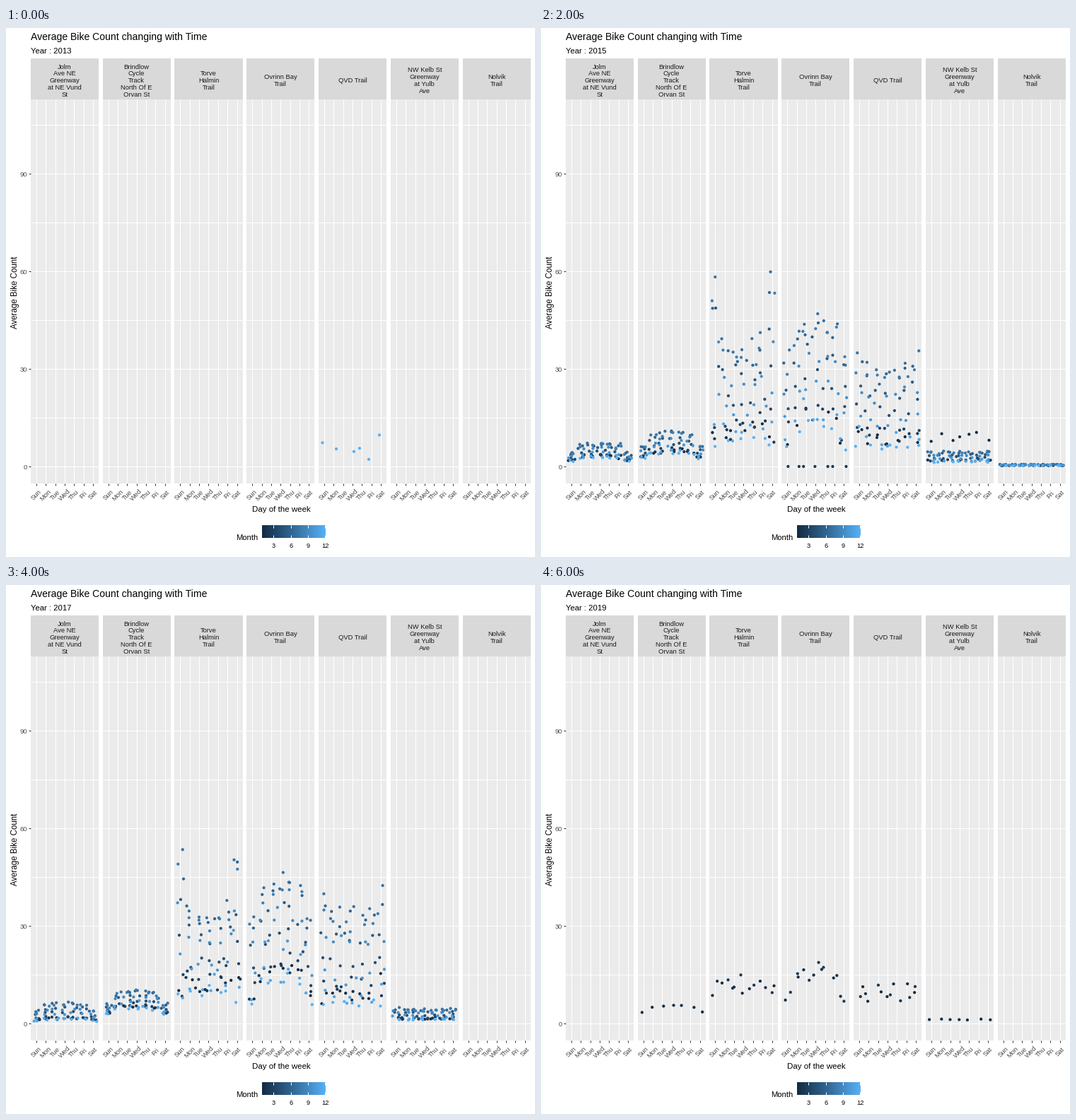
These frames come from a looping animation (748 by 748 pixels, 7 s). A matplotlib script:

```python
import matplotlib.pyplot as plt
import numpy as np
from matplotlib.animation import FuncAnimation
from matplotlib.colors import LinearSegmentedColormap
from matplotlib.patches import Rectangle

SIZE, DPI = 748, 100
LEFT, PITCH, WIDTH = 34.8, 101.8, 96.15
STRIP_TOP, TOP, BOTTOM = 43, 101, 644
ZERO_Y, UNIT = 620, 4.597
STEP = WIDTH / 7.2
DAYS = ["Sun", "Mon", "Tue", "Wed", "Thu", "Fri", "Sat"]
STRIPS = [
    "Jolm\nAve NE\nGreenway\nat NE Vund\nSt",
    "Brindlow\nCycle\nTrack\nNorth Of E\nOrvan St",
    "Torve\nHalmin\nTrail",
    "Ovrinn Bay\nTrail",
    "QVD Trail",
    "NW Kelb St\nGreenway\nat Yulb\nAve",
    "Nolvik\nTrail",
]
BLUES = LinearSegmentedColormap.from_list("blues", ["#132B43", "#336A98", "#56B1F7"])
YEARS = range(2013, 2020)

# Per panel: (low, high) at the weekend, at midweek, and their growth per year.
RANGES = [
    ((2.4, 4.6), (4.3, 7.8), (.6, .94)),
    ((2.2, 6.5), (3.6, 11.3), (1.07, .97)),
    ((5.5, 58), (7, 37), (1.05, .96)),
    ((5, 32), (12, 45), (1, 1)),
    ((6, 33), (5.5, 28), (.95, 1.06)),
    ((1.3, 4.6), (1.4, 4.4), (.9, 1)),
    ((.25, .65), (.25, .65), (1, 1)),
]
LAST_YEAR = [2018, 2019, 2019, 2019, 2019, 2019, 2015]
# Months when a counter was stuck near one level: (panel, year) -> (month, level).
STUCK = {(3, 2015): (2, 0), (5, 2015): (1, 9.2), (4, 2016): (7, 0),
         (5, 2016): (7, 0), (1, 2018): (2, 1.2)}
SPIKE = (282.5, 107.4, 4)


def panel_x(panel):
    return LEFT + PITCH * panel


def day_x(panel, day):
    return panel_x(panel) + STEP * (day + .6)


def count_y(value):
    return ZERO_Y - UNIT * value


def season(month):
    """Share of the yearly range: summer peak, winter slightly above December."""
    wave = (.5 - .5 * np.cos(2 * np.pi * (month - 1) / 12)) ** 1.4
    return .95 * (wave + .14 * (1 - (month - 1) / 10))


def recorded_months(panel, year):
    if year == 2019:
        return np.arange(1, 3 if panel in (2, 3, 4) else 2)
    months = np.arange(1, 13)
    if year == 2018 and panel == 0:
        return months[:4]
    if year == 2018 and panel == 2:
        return months[(months < 6) | (months > 8)]
    return months


def day_range(panel, year, day):
    weekend, midweek, growth = map(np.array, RANGES[panel])
    weight = (1 - ((day - 3) / 3) ** 2) ** .4
    limits = (weekend + (midweek - weekend) * weight) * growth ** (year - 2014)
    return limits + (4.3 if panel == 5 and year == 2014 else 0)


def panel_points(panel, year, rng):
    months = recorded_months(panel, year)
    stuck_month, level = STUCK.get((panel, year), (0, 0))
    points = []
    for day in range(7):
        low, high = day_range(panel, year, day)
        shares = np.abs(season(months) + rng.normal(0, .05, len(months)))
        values = low + (high - low) * shares
        values[months == stuck_month] = level * rng.uniform(.8, 1.2)
        xs = day_x(panel, day) + rng.uniform(-.4, .4, len(months)) * STEP
        points += zip(xs, values, months)
    return points


def year_points(year):
    rng = np.random.default_rng(year)
    points = []
    if year == 2013:
        points += zip((447.5, 467, 492, 500, 513, 528),
                      (7.3, 5.4, 4.6, 5.6, 2.2, 9.7), [12] * 6)
    for panel in range(7):
        if 2014 <= year <= LAST_YEAR[panel]:
            points += panel_points(panel, year, rng)
    if year == 2018:
        points.append(SPIKE)
    x, value, month = np.array(points).T
    return np.column_stack([x, count_y(value)]), BLUES((month - 1) / 11)


plt.rcParams["font.family"] = "Liberation Sans"
fig = plt.figure(figsize=(SIZE / DPI, SIZE / DPI), dpi=DPI, facecolor="white")
ax = fig.add_axes([0, 0, 1, 1])
ax.axis("off")


def box(x, y, w, h, color):
    ax.add_patch(Rectangle((x, y), w, h, facecolor=color, linewidth=0, zorder=1))


def line(xs, ys, color):
    ax.plot(xs, ys, color=color, linewidth=.72, solid_capstyle="butt", zorder=2)


def label(x, y, text, px, color="black", ha="left", angle=0):
    return ax.text(x, y, text, fontsize=px * .72, color=color, ha=ha, va="baseline",
                   rotation=angle, rotation_mode="anchor")


def draw_panel(panel):
    x = panel_x(panel)
    box(x, STRIP_TOP, WIDTH, TOP - STRIP_TOP, "#D9D9D9")
    box(x, TOP, WIDTH, BOTTOM - TOP, "#EBEBEB")
    for value in range(0, 106, 15):
        line([x, x + WIDTH], [count_y(value)] * 2, "white")
    for day, name in enumerate(DAYS):
        tick = day_x(panel, day)
        line([tick] * 2, [TOP, BOTTOM], "white")
        line([tick] * 2, [BOTTOM, BOTTOM + 3], "#333333")
        label(tick + 1.6, 662.4, name, 9.5, "#4D4D4D", "center", 45)
    rows = STRIPS[panel].split("\n")
    for i, row in enumerate(rows):
        y = 77.2 + 9.85 * (i - (len(rows) - 1) / 2)
        label(x + WIDTH / 2, y, row, 9.35, "#1A1A1A", "center")


def draw_legend():
    x0, x1, y0, y1 = 362, 452, 703, 721
    label(325, 724.5, "Month", 11.2)
    ax.imshow(np.linspace(0, 1, 256)[None], cmap=BLUES, extent=(x0, x1, y1, y0),
              aspect="auto", zorder=1)
    for month in (3, 6, 9, 12):
        x = x0 + (x1 - x0 - .7) * (month - 1) / 11
        line([x] * 2, [y0, y0 + 3.6], "white")
        line([x] * 2, [y1 - 3.6, y1], "white")
        label(x, 735, str(month), 9.3, ha="center")


for index in range(7):
    draw_panel(index)
for count in (0, 30, 60, 90):
    line([LEFT - 3, LEFT], [count_y(count)] * 2, "#333333")
    label(29.8, count_y(count) + 3.7, str(count), 9.5, "#4D4D4D", "right")
draw_legend()
label(35, 17, "Average Bike Count changing with Time", 14)
subtitle = label(35, 36, "", 11.3)
label(389, 684, "Day of the week", 11.45, ha="center")
label(16, 373.5, "Average Bike Count", 11.55, ha="center", angle=90)

ax.set_xlim(0, SIZE)
ax.set_ylim(SIZE, 0)
dots = ax.scatter([], [], s=9.2, linewidths=0, zorder=3)
SCENES = [year_points(year) for year in YEARS]


def update(frame):
    offsets, colors = SCENES[frame]
    dots.set_offsets(offsets)
    dots.set_facecolors(colors)
    subtitle.set_text(f"Year : {YEARS[frame]}")
    return dots, subtitle


anim = FuncAnimation(fig, update, frames=len(YEARS), interval=1000, repeat=True,
                     repeat_delay=0, blit=False)
plt.show()
```
